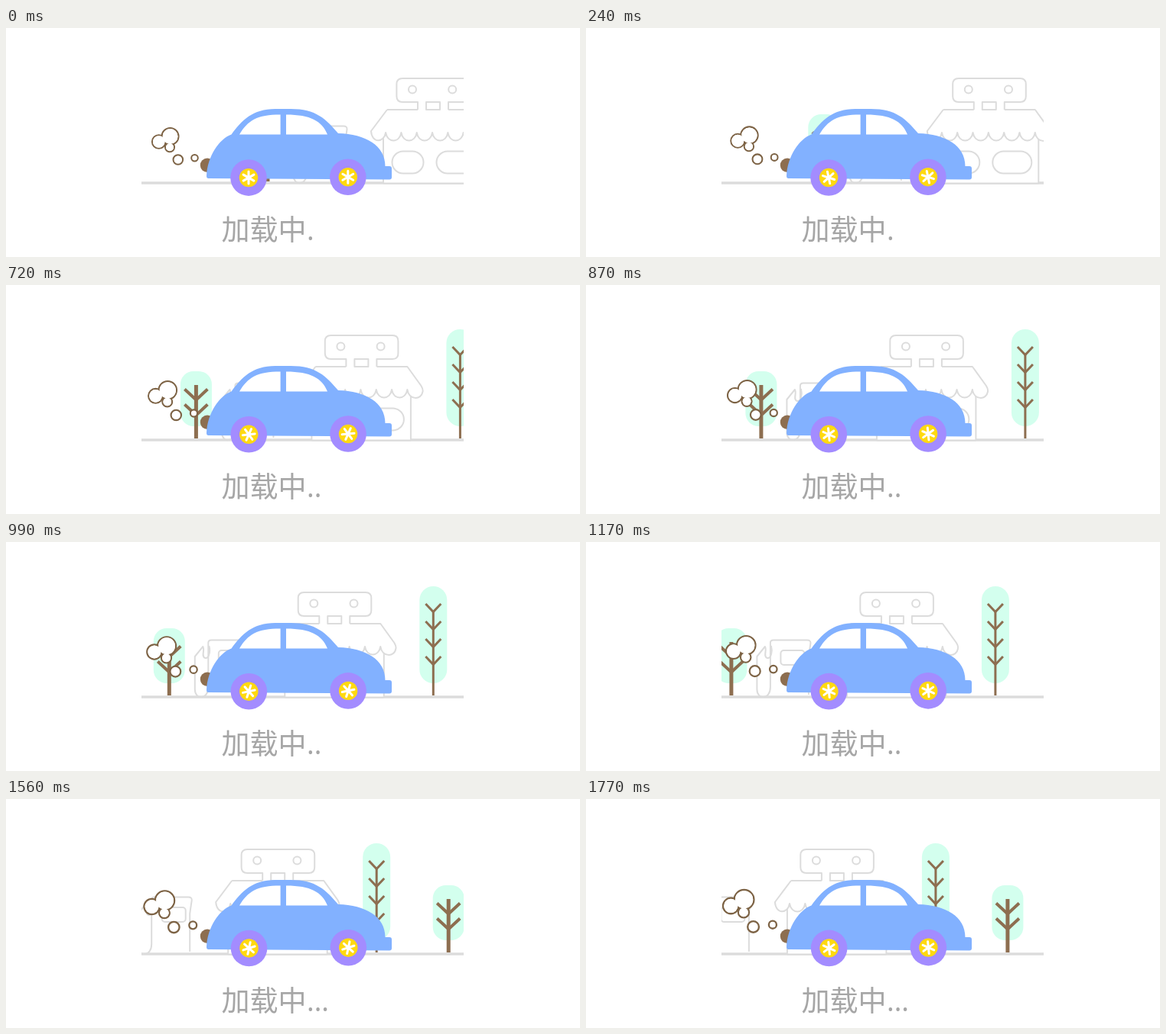
These frames come from a looping animation (750 px wide and 300 px high, 1800 ms). An HTML page:

```html
<!DOCTYPE html>
<html lang="zh">
<head>
<meta charset="utf-8">
<style>
  html, body { margin: 0; width: 100%; height: 100%; overflow: hidden; background: #fff; }
  svg { display: block; width: 750px; height: 300px; }
  .line { fill: none; stroke: #dcdcdc; stroke-width: 2; stroke-linejoin: round; }
  .solid { fill: #fff; }
  .wood { fill: none; stroke: #8d6e50; }
  .crown { fill: #d3ffee; }
  .body { fill: #82b1ff; }
  .smoke { fill: #fff; stroke: #7d6345; stroke-width: 2; }
  .fill { stroke: none; }
  text { font: 37px "Noto Sans CJK SC", "Noto Sans CJK", sans-serif; fill: #a6a6a6; }
  #dots { font: 36px "Noto Sans", sans-serif; }
</style>
</head>
<body>
<svg viewBox="0 0 750 300">
  <defs>
    <clipPath id="view"><rect x="177" y="0" width="421" height="300"/></clipPath>
    <g id="small">
      <rect class="crown" x="-20.5" y="113" width="41" height="72" rx="17"/>
      <path class="wood" stroke-width="5" d="M0 131V201"/>
      <path class="wood" stroke-width="4" d="M-15 136.5L0 150.5L15 136.5M-15 156.5L0 170.5L15 156.5"/>
    </g>
    <g id="tall">
      <rect class="crown" x="-18" y="58" width="36" height="127" rx="18"/>
      <path class="wood" stroke-width="3" d="M0 91V201"/>
      <path id="twigs" class="wood" stroke-width="3"/>
    </g>
    <g id="wheel">
      <circle r="23.8" fill="#a38cff"/>
      <circle r="12.2" fill="#ffd910"/>
      <path class="spokes" d="M0-8V8M-6.9-4L6.9 4M-6.9 4L6.9-4" stroke="#fff" stroke-width="3" stroke-linecap="round"/>
    </g>
  </defs>

  <g clip-path="url(#view)">
    <path d="M177 203H598" stroke="#dcdcdc" stroke-width="3.6"/>
    <g id="scene">
      <use href="#small" x="342"/>
      <use href="#small" x="781"/>
      <use href="#tall" x="687"/>
      <!-- fuel pump -->
      <g class="line">
        <path d="M393 190V132Q393 128.5 397 128.5H441Q446 128.5 445.5 133L443 150V200"/>
        <rect x="406.5" y="142" width="31" height="19" rx="4"/>
        <path d="M393 190C393 207 375.5 207 375.5 193V150L386 137C389 142 383 150 389 152C394 153 396 143 394 136"/>
      </g>
      <!-- shop -->
      <g class="line">
        <rect class="solid" x="493" y="138" width="129.5" height="65.6"/>
        <path id="awning" class="solid"/>
        <path d="M538 107V97H518Q510.4 97 510.4 89.500V73.500Q510.400 66 518 66H598.500Q606 66 606 73.500V89.500Q606 97 598.500 97H578V107M549 107V97H567V107Z"/>
        <circle cx="531" cy="80.500" r="5"/>
        <circle cx="583.200" cy="80.500" r="5"/>
        <rect x="504.500" y="161.500" width="41" height="29" rx="14.500"/>
        <rect x="562.500" y="161.500" width="51" height="29" rx="14.500"/>
      </g>
    </g>
  </g>

  <circle cx="263" cy="179.700" r="9.200" fill="#8d6e50"/>
  <g id="smoke"></g>

  <!-- car -->
  <path class="body" d="M294.500 139.500C308 121 322 106 352 106H372C405 106 418 119 434 138C470 139 495.500 154 495.500 181H501Q504 181 504 184V195.500Q504 198.500 501 198.500L264.500 197Q262 197 262 194C263 168 279 145 294.500 139.500Z"/>
  <path fill="#fff" d="M305 139.500C316 121 328 113.500 358.600 113.500V139.500ZM366 113.500C398 113.500 413 122 420 139.500H366Z"/>
  <g id="rear"><use href="#wheel"/></g>
  <g id="front"><use href="#wheel"/></g>

  <text x="281.500" y="278">加载中</text>
  <text id="dots" x="393" y="278">.</text>
</svg>

<script>
  const LOOP = 1800, STEP = 30, SPEED = 0.13;
  const $ = id => document.getElementById(id);

  $("twigs").setAttribute("d", [82, 105, 128, 151]
    .map(y => `M-10 ${y - 1}L0 ${y + 9.5}L10 ${y - 1}`).join(""));

  // Eight scallops, drawn from right to left under the sloping roof
  const scallop = 162.5 / 8;
  let awning = "M498 107H538M549 107H567M578 107H618L636 132Q639 137 638 140";
  for (let i = 7; i >= 0; i--) {
    const x = 475.8 + i * scallop;
    const end = i ? `${x} 137` : "477 135";
    awning += `C${x + scallop - 2} 151 ${x + 2} 151 ${end}`;
  }
  awning += "L498 107";
  $("awning").setAttribute("d", awning);

  const puff = ([x, y, r], cls, inset) =>
    `<circle class="smoke ${cls}" cx="${x}" cy="${y}" r="${r - inset}"/>`;
  const cloud = [[214.5, 142, 11], [199.7, 149, 8.8], [214, 156.2, 6]];
  const rings = [[224.8, 172.5, 6.3], [246.5, 170.2, 4.3]];
  $("smoke").innerHTML =
    cloud.map(c => puff(c, "", 0)).join("") +
    cloud.map(c => puff(c, "fill", 1)).join("") +
    rings.map(c => puff(c, "", 0)).join("");

  const spokes = document.querySelector(".spokes");
  const place = (id, x, y) => $(id).setAttribute("transform", `translate(${x} ${y})`);

  function draw(t) {
    const p = t / LOOP;
    place("scene", -SPEED * t, 0);
    $("smoke").setAttribute("transform",
      `translate(262 203) scale(${1 + 0.17 * p}) translate(-262 -203)`);
    place("rear", 317 + 0.6 * p, 196.1 - 0.7 * p);
    place("front", 446.8 + 0.6 * p, 195.3 - 0.7 * p);
    spokes.setAttribute("transform", `rotate(${360 * p})`);
    $("dots").textContent = ".".repeat(1 + Math.floor(t / 600));
  }

  const start = performance.now();
  function tick() {
    const t = (performance.now() - start) % LOOP;
    draw(Math.floor(t / STEP) * STEP);
    requestAnimationFrame(tick);
  }
  draw(0);
  requestAnimationFrame(tick);
</script>
</body>
</html>
```
